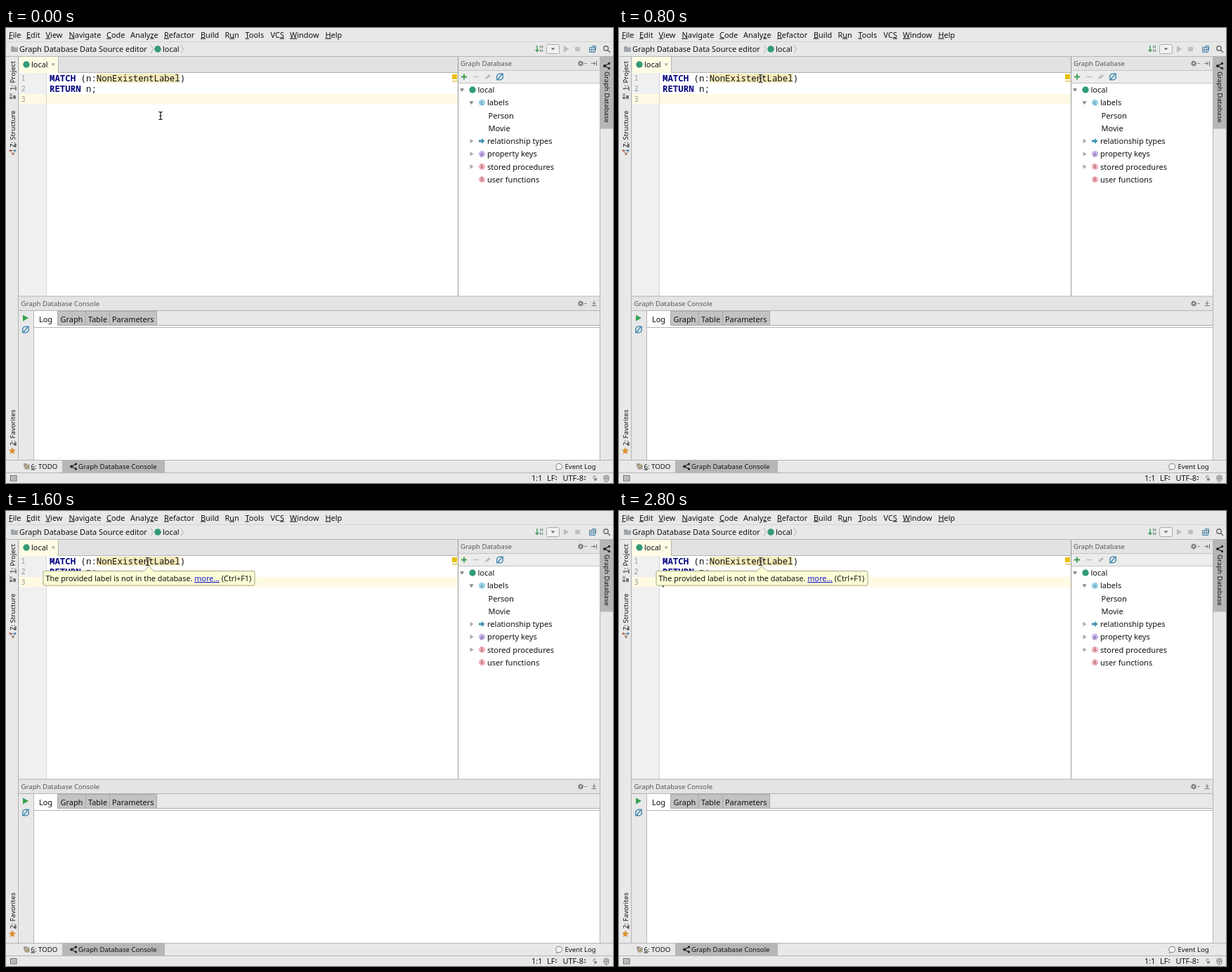
Animation, 864 px wide and 648 px high, one loop 3000 ms. Source, as an HTML page:

```html
<!DOCTYPE html>
<html lang="en">
<head>
<meta charset="utf-8">
<title>Graph database editor</title>
<style>
html, body { margin: 0; width: 100%; height: 100%; overflow: hidden; background: #e8e8e8; }
svg { display: block; width: 100vw; height: 100vh; }
text { font: 10.95px "Noto Sans", sans-serif; fill: #111; white-space: pre; }
.small { font-size: 9.6px; }
.muted { fill: #555; }
.code { font: 12.38px "Noto Sans Mono", monospace; }
.keyword { font-weight: 700; fill: #000080; }
.line-no { font: 10.2px "Noto Sans Mono", monospace; fill: #999; }
.u { text-decoration: underline; }
.link { fill: #1414c8; text-decoration: underline; }
.rule { stroke: #b4b4b4; fill: none; }
.stroke { fill: none; stroke-width: 1.4; }
#tree text { font-size: 11.05px; }
#tooltip text { font-size: 10.84px; }
#caret, #pointer, #tooltip { animation: 3s step-end infinite; }
#caret { animation-name: blink; }
#pointer { animation-name: move; }
#tooltip { animation-name: show; }
@keyframes blink {
  0%, 26.66%, 53.33%, 79.99% { opacity: 0 }
  13.33%, 39.99%, 66.66%, 93.33%, 100% { opacity: 1 }
}
@keyframes move {
  0% { transform: translate(220px, 125px) }
  6.66% { transform: translate(220px, 124px) }
  13.33% { transform: translate(220px, 118px) }
  19.99% { transform: translate(208px, 86px) }
  26.66%, 100% { transform: translate(201.5px, 72px) }
}
@keyframes show { 0% { opacity: 0 } 33.33%, 100% { opacity: 1 } }
</style>
</head>
<body>
<svg viewBox="0 0 864 648">
<defs>
  <g id="gear" fill="none" stroke="#707070">
    <circle r="2.2" stroke-width="1.5"/>
    <circle r="3.5" stroke-width="1.2" stroke-dasharray="1.37 1.37"/>
    <path d="M5.5 0h3"/>
  </g>
  <g id="refresh" class="stroke" stroke="#3e88ae">
    <path d="M-3.8 1.5A4 4 0 0 1 2.5-3.2M3.8-1.5A4 4 0 0 1-2.5 3.2M-3.8 4.2 3.8-4.2"/>
    <path d="M1-4.5H4.5V-1M-1 4.5H-4.5V1" stroke-width="1"/>
  </g>
  <g id="share" fill="#222" stroke="#222">
    <path d="M3.5-3.5-3 0 3.5 3.5" fill="none" stroke-width="1.3"/>
    <circle cx="-3" r="1.5"/><circle cx="3.5" cy="-3.5" r="1.2"/><circle cx="3.5" cy="3.5" r="1.2"/>
  </g>
  <path id="open" d="M-3-2H3L0 3z" fill="#888"/>
  <path id="closed" d="M-2-3.3 3 0-2 3.3z" fill="#aaa"/>
  <path id="spin" d="M-1.6-1 0-3 1.6-1zM-1.6 1 0 3 1.6 1z" fill="#444"/>
  <circle id="source" r="4.7" fill="#329b76"/>
  <path id="beam" d="M-2.7-5.5Q0-5.5 0-4V4Q0 5.5-2.7 5.5M2.7-5.5Q0-5.5 0-4V4Q0 5.5 2.7 5.5M-1.500 0H1.500"/>
</defs>

<rect width="864" height="648" fill="#e8e8e8"/>

<!-- Menu and navigation bar -->
<g id="menu"></g>
<path class="rule" d="M0 19.5H864" style="stroke:#d2d2d2"/>
<path class="rule" d="M0 40.5H864"/>
<path d="M7 26h4l1 1.5h5V34H7z" fill="#a2a7ac"/>
<text x="19" y="34">Graph Database Data Source editor</text>
<path class="rule" d="M206 24l3.5 6-3.5 6M249 24l3.5 6-3.5 6"/>
<use href="#source" x="216" y="30"/>
<text x="223" y="34">local</text>
<path class="stroke" stroke="#3e9b58" d="M756 25v8M753.7 31l2.3 2.5 2.3-2.5"/>
<path d="M760 25h1.5v3.5H760zM760 30.5h1.5V34H760zM762.7 25h1.5v3.5h-1.5zM762.7 30.5h1.5V34h-1.5z" fill="#779482"/>
<rect x="769.5" y="23.5" width="18" height="13" rx="2" fill="#f1f1f1" stroke="#aaa"/>
<path d="M775.5 28.5h6l-3 3z" fill="#666"/>
<path d="M794 25.5 801 30l-7 4.5z" fill="#bbb"/>
<circle cx="813.5" cy="30" r="3.5" fill="#c1c1c1"/>
<path d="M809.5 27.500l8 5M809.500 32.500l8-5" stroke="#bdbdbd"/>
<path d="M830.5 27.500h8v7h-8zM830.500 31h8M833 27.500v7M836 25.500v9M834 25.500h5.500v6" fill="none" stroke="#4f87a8"/>
<g class="stroke" stroke="#666"><circle cx="854" cy="29" r="3.2"/><path d="M856.5 31.5 860 35"/></g>

<!-- Editor -->
<rect x="18" y="41" width="626" height="22" fill="#e2e2e2"/>
<rect x="19" y="41" width="55" height="23" fill="#fffce5"/>
<path class="rule" d="M74.5 41V63.5H643"/>
<use href="#source" x="29" y="52"/>
<text x="36" y="56">local</text>
<path d="M65.5 50l3.5 3.5M69 50l-3.5 3.5" stroke="#777"/>
<rect x="19" y="64" width="39" height="318" fill="#f0f0f0"/>
<rect x="58" y="64" width="585" height="318" fill="#fff"/>
<rect x="19" y="94" width="624" height="14.5" fill="#fffae3"/>
<path class="rule" d="M57.5 64V382" style="stroke:#d5d5d5"/>
<rect x="129" y="65" width="118.5" height="13" fill="#f6ebbc"/>
<text class="line-no" x="21.5" y="75">1</text>
<text class="line-no" x="21.5" y="90">2</text>
<text class="line-no" x="21.5" y="105">3</text>
<text class="code" x="62" y="76"><tspan class="keyword">MATCH</tspan> (n:NonExistentLabel)</text>
<text class="code" x="62" y="90.5"><tspan class="keyword">RETURN</tspan> n;</text>
<rect x="635" y="66" width="7" height="7" fill="#e8c000"/>
<rect x="635" y="75" width="8" height="1.3" fill="#dfc040"/>

<!-- Database tree -->
<rect x="644" y="41" width="202" height="19" fill="#e4e4e4"/>
<rect x="644" y="60" width="202" height="18" fill="#ececec"/>
<rect x="644" y="79" width="202" height="303" fill="#fff"/>
<path class="rule" d="M644 60.5H846M644 78.5H846" style="stroke:#c4c4c4"/>
<path class="rule" d="M643.5 41V382" style="stroke:#999"/>
<text class="small muted" x="647" y="54">Graph Database</text>
<use href="#gear" x="818" y="50.5"/>
<path d="M833 50.5h6M836.5 48.5l2.5 2-2.5 2M840.5 47v7" fill="none" stroke="#707070"/>
<path class="stroke" stroke="#3a9a50" style="stroke-width:1.8" d="M648 69.5h8M652 65.5v8"/>
<path class="stroke" stroke="#bbb" d="M665 69.5h8"/>
<path d="M682 73l1-3 5-4 2 2-5 4z" fill="#b8b8b8"/>
<use href="#refresh" x="703" y="69.5"/>
<g id="tree"></g>

<!-- Console -->
<rect x="18" y="382" width="828" height="20" fill="#e4e4e4"/>
<path class="rule" d="M18 382H846M18 402.5H846"/>
<text class="small muted" x="21.5" y="395.5">Graph Database Console</text>
<use href="#gear" x="818" y="392.5"/>
<path d="M837 388.500v5M835 391.5l2 2.500 2-2.500M833.500 395.500h7" fill="none" stroke="#707070"/>
<rect x="40" y="403" width="34" height="21" fill="#fff"/>
<rect x="74" y="403.5" width="140.5" height="20" fill="#c2c2c2"/>
<path class="rule" d="M73.5 403.5H214.5V423.5H846M73.5 403.5V423.5H214M113.5 404V423M147.5 404V423" style="stroke:#aaa"/>
<text x="47" y="418.5">Log</text>
<text x="77.5" y="418.5">Graph</text>
<text x="117" y="418.5">Table</text>
<text x="151" y="418.5">Parameters</text>
<rect x="40" y="424" width="806" height="191" fill="#fff"/>
<path class="rule" d="M40 426.5H846M39.5 403V615"/>
<path d="M24 408.5 32 413l-8 4.5z" fill="#35a350"/>
<use href="#refresh" x="28" y="429.5"/>

<!-- Side and bottom stripes -->
<path class="rule" d="M17.5 41V615M845.5 41V615"/>
<rect x="846" y="41" width="18" height="102.5" fill="#b6b6b6"/>
<use href="#share" x="855" y="54"/>
<text class="small" transform="translate(851.5 62) rotate(90)">Graph Database</text>
<text class="small" transform="translate(12.5 89) rotate(-90)"><tspan class="u">1</tspan>: Project</text>
<text class="small" transform="translate(12.5 170) rotate(-90)"><tspan class="u">Z</tspan>: Structure</text>
<text class="small" transform="translate(12.5 595) rotate(-90)"><tspan class="u">2</tspan>: Favorites</text>
<path d="M5 93h4v4H5z" fill="#aaa"/><path d="M5 98h4v3H5zM10 96h4v5h-4z" fill="#777"/>
<path d="M6 174.5h7l-3 5z" fill="none" stroke="#777"/>
<circle cx="6" cy="174.5" r="1.5" fill="#c45c55"/><circle cx="13" cy="174.5" r="1.5" fill="#4788b5"/><circle cx="10" cy="179.5" r="1.5" fill="#b96a55"/>
<path d="M9 597l1.5 3.3 3.5.4-2.6 2.4.7 3.6L9 605l-3.1 1.7.7-3.6L4 600.7l3.5-.4z" fill="#d99032"/>
<path class="rule" d="M0 615.5H864M0 633.5H864"/>
<rect x="80" y="616" width="146" height="17" fill="#b6b6b6"/>
<path d="M25 620h5v5h-5z" fill="#a8a8a8"/><path d="M27 622h6v6h-6z" fill="#d2b78a" stroke="#777" stroke-width=".7"/><path d="M28.5 625l1.5 1.5 2.5-3" fill="none" stroke="#49765c"/>
<text class="small" x="35.5" y="627.5"><tspan class="u">6</tspan>: TODO</text>
<use href="#share" x="96" y="624.5"/>
<text class="small" x="103" y="627.5">Graph Database Console</text>
<path d="M784 627.5a4.6 4.2 0 1 1 3 1.2l-3.5.8z" fill="#f5f5f5" stroke="#777" stroke-width=".9"/>
<text class="small" x="795.5" y="627.5">Event Log</text>
<rect x="6.5" y="637.5" width="8.5" height="7.5" fill="#d0d0d0" stroke="#666"/>
<path d="M8 640h6M8 642.5h6" stroke="#999"/>
<text x="748" y="645">1:1</text>
<text x="770" y="645">LF</text><use href="#spin" x="783" y="641"/>
<text x="792.5" y="645">UTF-8</text><use href="#spin" x="824" y="641"/>
<path d="M836 641v-1.5a1.6 1.6 0 0 1 3.2 0" fill="none" stroke="#777"/><rect x="837" y="641" width="4" height="3.5" fill="#888"/>
<path d="M850.5 641a4 4 0 0 1 8 0zM851 642h7v2l-2 2h-3l-2-2zM852 639h5M854.5 642v4" fill="#ddd" stroke="#888"/>

<rect id="caret" x="62" y="94" width="1.4" height="14.5"/>
<g id="tooltip">
  <path d="M55 85.5H196.5L203.5 78.5 210.5 85.5H352a2 2 0 0 1 2 2V104a2 2 0 0 1-2 2H55a2 2 0 0 1-2-2V87.5a2 2 0 0 1 2-2z" fill="#fdfed5" stroke="#a5a58c"/>
  <text x="56.5" y="100">The provided label is not in the database. <tspan class="link">more...</tspan> (Ctrl+F1)</text>
</g>
<g id="pointer" fill="none">
  <use href="#beam" stroke="#fff" stroke-width="2.2" opacity=".5"/>
  <use href="#beam" stroke="#111" stroke-width="1.2"/>
</g>
</svg>
<script>
// An underscore precedes each mnemonic letter.
const menu = [
  ["_File", 4], ["_Edit", 29], ["_View", 56.5], ["_Navigate", 89.5], ["_Code", 143],
  ["Analy_ze", 177], ["_Refactor", 225], ["_Build", 277], ["R_un", 311.5],
  ["_Tools", 340.5], ["VC_S", 376.5], ["_Window", 404], ["_Help", 454.5]
];
document.getElementById("menu").innerHTML = menu.map(([label, x]) =>
  `<text x="${x}" y="13.5">${label.replace(/_(.)/, '<tspan class="u">$1</tspan>')}</text>`
).join("");

const badge = (letter, fill, ink) => y =>
  `<circle cx="677.5" cy="${y}" r="4.6" fill="${fill}"/>
   <text x="677.5" y="${y + 2.5}" text-anchor="middle" style="font-size:7px;fill:${ink}">${letter}</text>`;
const use = (id, x) => y => `<use href="#${id}" x="${x}" y="${y}"/>`;
const arrow = y => `<path d="M673 ${y - 1.5}h4v-2.5l4.5 4-4.5 4v-2.5h-4z" fill="#3f91b3"/>`;
const lambda = badge("λ", "#f3b5bd", "#8b3644");
const closed = use("closed", 662.5);
const rows = [
  ["local", 671.5, use("open", 649), use("source", 664)],
  ["labels", 685, use("open", 662.5), badge("c", "#9bd3e8", "#32677e")],
  ["Person", 686.5],
  ["Movie", 686.5],
  ["relationship types", 685, closed, arrow],
  ["property keys", 685, closed, badge("p", "#cdb9eb", "#66478f")],
  ["stored procedures", 685, closed, lambda],
  ["user functions", 685, lambda]
];
document.getElementById("tree").innerHTML = rows.map(([label, x, ...icons], i) => {
  const y = 88 + i * 18.25;
  return icons.map(icon => icon(y)).join("") + `<text x="${x}" y="${y + 4}">${label}</text>`;
}).join("");
</script>
</body>
</html>
```
